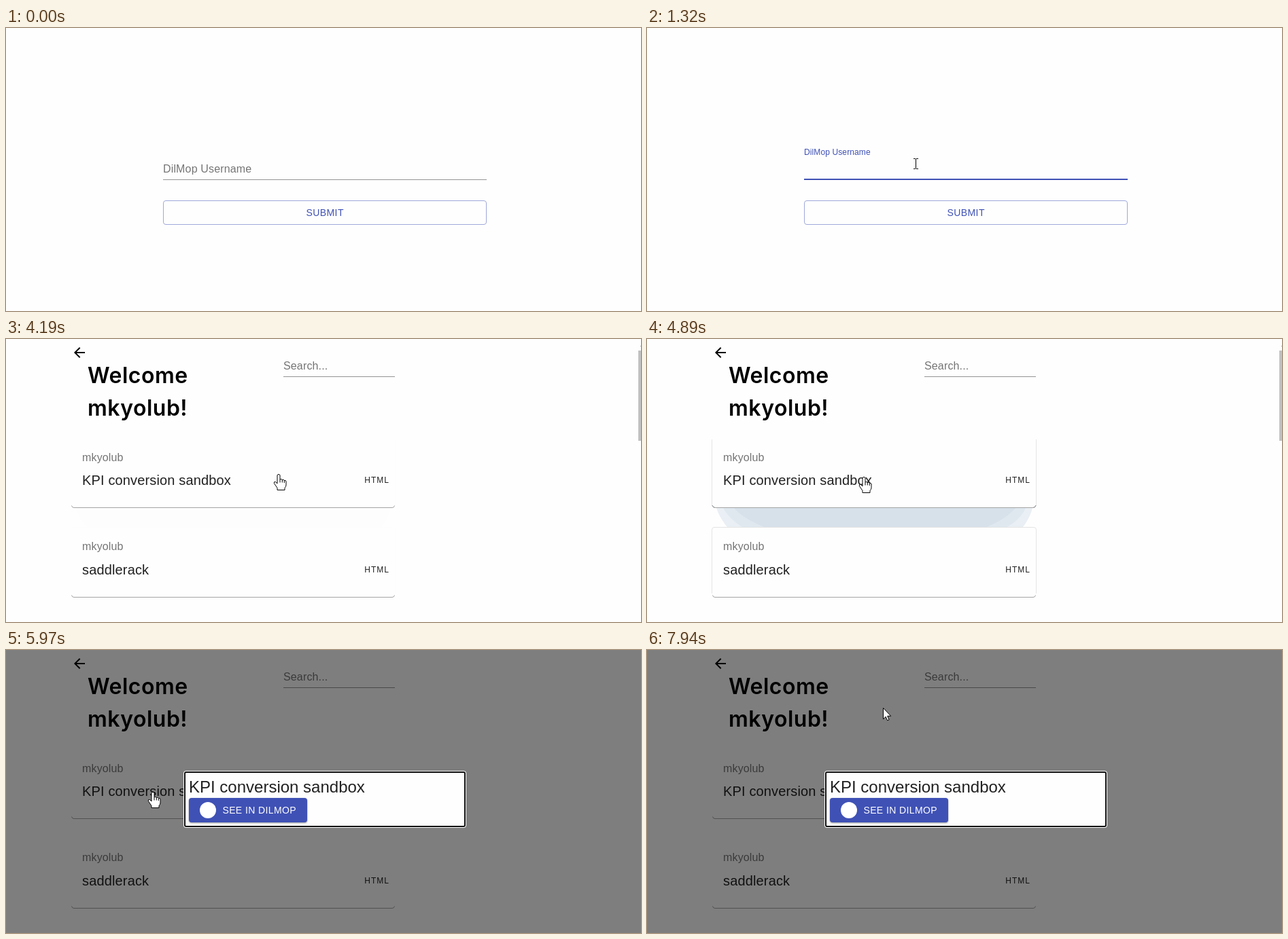
An HTML page for the animation above (8000 ms loop, 934 by 417 pixels).

```html
<!DOCTYPE html>
<html lang="en">
<head>
<meta charset="utf-8">
<title>Repository browser</title>
<style>
  html, body { margin: 0; width: 100%; height: 100%; overflow: hidden; background: #fefefe; }
  svg { display: block; width: 934px; height: 417px; font-family: "Liberation Sans", Arial, sans-serif; }
  text { fill: #212121; white-space: pre; }
  .muted { font-size: 16px; letter-spacing: .15px; fill: #757575; }
  .title { font-size: 20px; letter-spacing: .15px; }
  .tag { font-size: 12px; letter-spacing: 1px; }
  .button { font-size: 14px; letter-spacing: .4px; }
  .heading { font: 600 32px Inter, sans-serif; letter-spacing: .5px; fill: #000; }
  .pointer path { fill: #fff; stroke: #000; }
</style>
</head>
<body>
<svg viewBox="0 0 934 417">
  <g id="login">
    <text id="label" class="muted">DilMop Username</text>
    <text id="typed" x="231" y="213" font-size="16"></text>
    <rect id="caret" y="199" width="1" height="17" fill="#111"/>
    <rect x="231" y="223" width="476" height="1" fill="#949494"/>
    <rect id="hoverLine" x="231" y="222" width="476" height="2" fill="#212121"/>
    <rect id="focusLine" y="222" height="2" fill="#3f51b5"/>
    <rect id="submit" x="231.5" y="254.5" width="475" height="35" rx="3.5"/>
    <text class="button" x="469.2" y="277" text-anchor="middle" style="fill:#3f51b5">SUBMIT</text>
  </g>

  <g id="list">
    <path transform="translate(96 8)" d="M20 11H7.83l5.59-5.59L12 4l-8 8 8 8 1.41-1.41L7.83 13H20z"/>
    <text class="heading" x="120" y="65">Welcome</text>
    <text class="heading" x="120" y="113">mkyolub!</text>
    <text class="muted" x="408" y="45">Search...</text>
    <rect x="408" y="55" width="164" height="1" fill="#949494"/>

    <g id="raised" fill="none">
      <path fill="#e9eff4" d="M102 249Q107 264 118 277H553Q563 264 567 249z"/>
      <path fill="#e0e8ef" d="M112 249Q121 265 140 277H530Q550 265 557 249z"/>
      <path fill="#d7e1ea" d="M128 249Q140 264 172 277H500Q530 264 542 249z"/>
      <path stroke="#e4e4e4" d="M95.5 148V246M572.5 148V246M95.5 375V281Q95.5 277.5 99 277.5H569Q572.5 277.5 572.5 281V375"/>
      <path stroke="#7c848b" d="M96 245Q97 248.5 100 248.5H568Q571.5 248.5 572 245"/>
    </g>

    <path id="edge" fill="none" stroke="#a4a4a4" d="M96.5 245.5Q97 248.5 100 248.5H568Q571 248.5 571.5 245.5"/>
    <text class="muted" x="112" y="180">mkyolub</text>
    <text class="title" x="112" y="215">KPI conversion sandbox</text>
    <text class="tag" x="527.3" y="212">HTML</text>

    <use href="#edge" y="132"/>
    <text class="muted" x="112" y="311">mkyolub</text>
    <text class="title" x="112" y="347">saddlerack</text>
    <text class="tag" x="527.3" y="344">HTML</text>

    <g id="scrollbar">
      <rect x="930" y="17" width="4" height="133" fill="#c1c1c1"/>
      <rect x="933" y="10" width="1" height="1" fill="#999"/>
    </g>
  </g>

  <g id="modal">
    <rect width="934" height="417" opacity=".5"/>
    <rect x="261" y="178" width="416" height="84" rx="4" fill="#fff"/>
    <rect x="262" y="179" width="414" height="82" rx="3" fill="#101010"/>
    <rect x="264" y="181" width="410" height="78" rx="1" fill="#fefefe"/>
    <text x="269" y="210" font-size="24">KPI conversion sandbox</text>
    <rect id="openButton" x="269" y="218" width="174" height="36" rx="4"/>
    <circle cx="297" cy="236" r="12" fill="#fff"/>
    <text class="button" x="318.4" y="241" style="fill:#fff">SEE IN DILMOP</text>
  </g>

  <circle id="click" r="14.5" fill="#f9f53c" opacity=".8" style="mix-blend-mode:multiply"/>
  <g id="arrow" class="pointer">
    <path d="M.5 .5V16.8L4.2 13.3 6.6 18.8 9 17.8 6.7 12.3H11.7z"/>
  </g>
  <g id="hand" class="pointer">
    <path d="M-2 1.5Q0-1 2 1.5V8Q4 6.5 5.3 8.5Q7.3 7.3 8.3 9.5Q10.7 8.5 11 11V16Q11 18.5 9 20.5V23.5H-2V20.5L-6.7 13.5Q-7 10.8-4.5 11.5L-2 14z"/>
    <path d="M2 8V12.5M5.3 8.5V12.5M8.3 9.5V13"/>
  </g>
  <g id="beam" fill="none" stroke="#000">
    <path d="M-3-7.5H0M1-7.5H4M-3 7.5H0M1 7.5H4M.5-7V7"/>
  </g>
</svg>
<script>
const LOOP = 8000, FOCUS = 790, LIST = 3530, HOVER = 4190, MODAL = 5970;
const USER = "mkyolub";
const KEY_TIMES = [1650, 1720, 2050, 2180, 2310, 2510, 2580];
// time, x, y of the pointer's hot spot
const PATH = [
  [100, 430, 306], [380, 402, 170], [720, 395, 202], [790, 395, 202], [860, 395, 200],
  [4120, 395, 200], [4190, 401, 199], [5710, 216, 209], [6700, 216, 209], [6970, 290, 234],
  [7110, 290, 234], [7460, 187, 246], [7940, 347, 85]
];

const $ = id => document.getElementById(id);
const clamp = v => Math.min(1, Math.max(0, v));
const easeOut = v => 1 - (1 - clamp(v)) ** 3;
const smooth = v => v * v * (3 - 2 * v);
const show = (id, on) => { $(id).style.display = on ? "" : "none"; };
const set = (id, attrs) => { for (const name in attrs) $(id).setAttribute(name, attrs[name]); };
const mix = (a, b, p) => `rgb(${a.map((v, i) => Math.round(v + (b[i] - v) * p))})`;
const inside = ([x, y], left, top, right, bottom) => x >= left && x < right && y >= top && y < bottom;

function pointerAt(t) {
  const next = PATH.findIndex(point => point[0] > t);
  if (next < 0) return PATH.at(-1).slice(1);
  if (next === 0) return PATH[0].slice(1);
  const [t0, x0, y0] = PATH[next - 1], [t1, x1, y1] = PATH[next];
  const p = smooth((t - t0) / (t1 - t0));
  return [Math.round(x0 + (x1 - x0) * p), Math.round(y0 + (y1 - y0) * p)];
}

function drawLogin(t, overField, overSubmit) {
  const p = easeOut((t - FOCUS) / 200);
  set("label", { transform: `translate(231 ${213 - 26 * p}) scale(${1 - p / 4})` });
  $("label").style.fill = mix([117, 117, 117], [63, 81, 181], p);
  set("focusLine", { x: 469 - 238 * p, width: 476 * p });
  show("hoverLine", overField && p < 1);
  set("submit", {
    fill: overSubmit ? "#f7f8fc" : "none",
    stroke: overSubmit ? "#3f51b5" : "#9fa8da"
  });
  const typed = USER.slice(0, KEY_TIMES.filter(time => time <= t).length);
  $("typed").textContent = typed;
  const width = typed ? $("typed").getComputedTextLength() : 0;
  set("caret", { x: Math.round(231 + width) });
  show("caret", t >= FOCUS && !(t >= 1320 && t < KEY_TIMES[0]));
}

function drawPointer(t, spot, kind) {
  for (const id of ["arrow", "hand", "beam"]) {
    show(id, t >= 100 && id === kind);
    set(id, { transform: `translate(${spot})` });
  }
  show("click", (t >= FOCUS && t < 900) || (t >= 5840 && t < MODAL));
  set("click", { cx: spot[0] - 1, cy: spot[1] });
}

function draw(t) {
  const spot = pointerAt(t);
  const onLogin = t < LIST, onModal = t >= MODAL;
  const overField = onLogin && t >= 100 && inside(spot, 231, 192, 707, 226);
  const overSubmit = onLogin && t >= 100 && inside(spot, 231, 254, 707, 290);
  const overOpen = onModal && inside(spot, 269, 218, 443, 254);
  const overCard = !onLogin && !onModal && inside(spot, 96, 146, 572, 248);
  const waiting = onModal && t < 6760;

  show("login", onLogin);
  show("list", !onLogin);
  show("modal", onModal);
  show("scrollbar", !onModal);
  show("raised", !onModal);
  set("raised", { opacity: easeOut((t - HOVER) / 300) });
  set("openButton", { fill: overOpen ? "#303f9f" : "#3f51b5" });
  $("openButton").style.filter =
    `drop-shadow(0 ${overOpen ? 2 : 1}px ${overOpen ? 2 : 1}px rgba(0,0,0,.4))`;

  if (onLogin) drawLogin(t, overField, overSubmit);
  drawPointer(t, spot,
    overField ? "beam" : overSubmit || overCard || overOpen || waiting ? "hand" : "arrow");
}

const start = performance.now();
function tick() {
  draw((performance.now() - start) % LOOP);
  requestAnimationFrame(tick);
}
tick();
</script>
</body>
</html>
```
